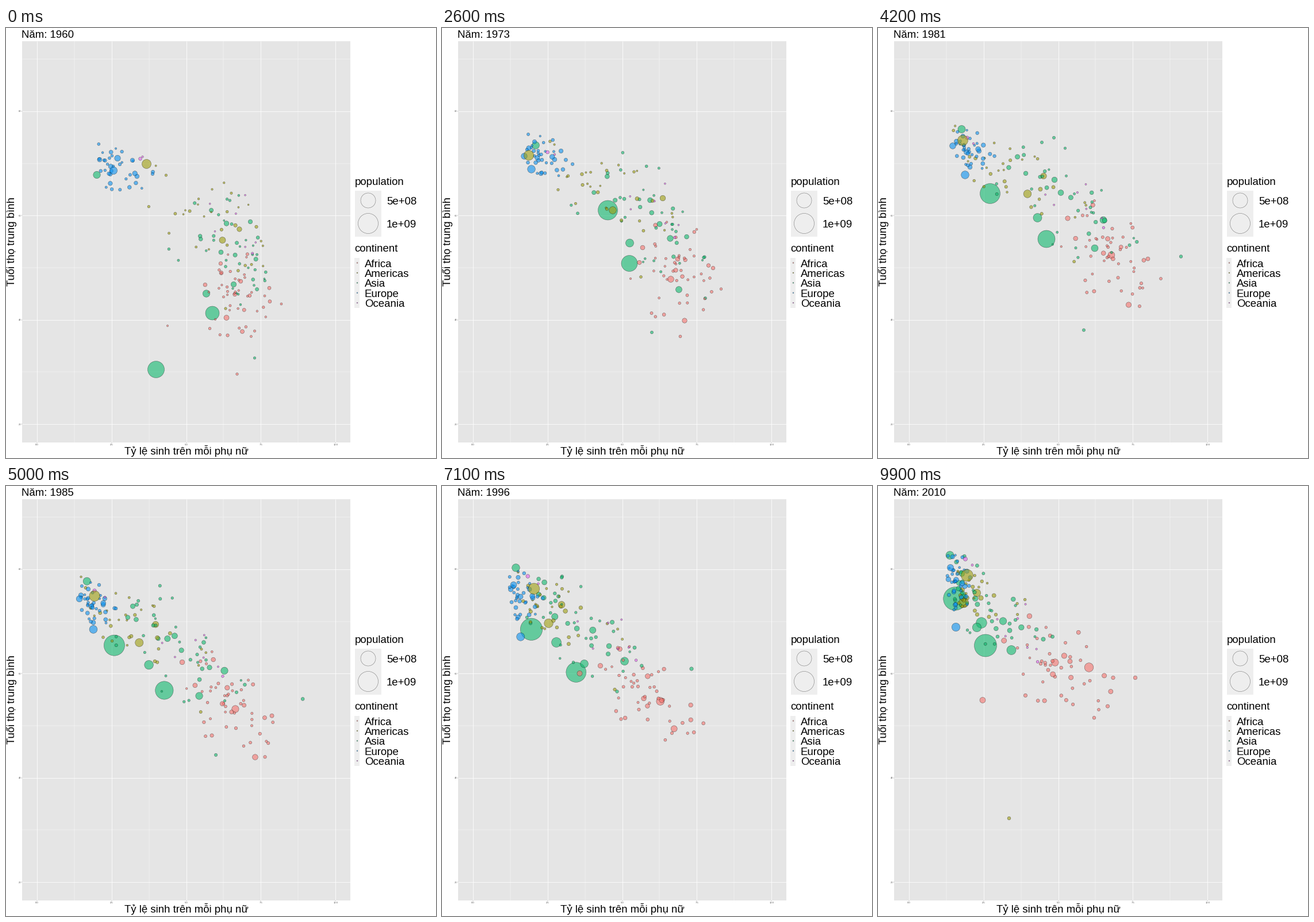
A matplotlib script that plays this animation: 748 by 748 pixels, repeating every 10 s.

```python
import numpy as np
import matplotlib.pyplot as plt
from matplotlib.animation import FuncAnimation
from matplotlib.patches import Circle, Rectangle

SIZE, FRAMES, PT = 748, 100, 0.72  # PT: points per pixel at 100 dpi
T = np.arange(FRAMES)
KEYS = {2: (0, 99), 3: (0, 42, 99), 4: (0, 26, 59, 99),
        7: (0, 12, 26, 42, 59, 83, 99)}
COLORS = {
    "Africa": (0.96, 0.45, 0.43),
    "Americas": (0.62, 0.62, 0.06),
    "Asia": (0.06, 0.72, 0.43),
    "Europe": (0.04, 0.57, 0.94),
    "Oceania": (0.88, 0.38, 0.93),
}
FILL_ALPHA = 0.6
EDGE = (0, 0, 0, 0.55)

plt.rcParams["font.family"] = "Liberation Sans"
rng = np.random.default_rng(12)
tracks = []  # (x, y, radius, colour), each path sampled at every frame


def curve(vals, times=None):
    return np.interp(T, times or KEYS[len(vals)], vals)


def bubble(group, r, xs, ys, times=None):
    tracks.append((curve(xs, times), curve(ys, times), curve(r), COLORS[group]))


def cloud(group, n, xs, ys, sx, sy, corr, skew, r, grow):
    """A drifting, correlated swarm of small bubbles."""
    cx, cy, wx, wy = map(curve, (xs, ys, sx, sy))
    rho, k = curve(corr), curve(skew)
    for _ in range(n):
        a, b = rng.normal(size=2).clip(-1.7, 1.7)
        phase, freq = rng.uniform(0, 2 * np.pi, 2), rng.uniform(0.5, 1.6, 2)
        u = a + 0.2 * np.sin(2 * np.pi * freq[0] * T / FRAMES + phase[0])
        v = b + 0.2 * np.sin(2 * np.pi * freq[1] * T / FRAMES + phase[1])
        x = cx + wx * (u + k * (u * u - 1))
        y = cy + wy * (rho * u + np.sqrt(1 - rho ** 2) * v)
        size = r[0] + r[1] * min(abs(rng.normal()), 2.2)
        tracks.append((x, y, size * np.linspace(1, grow, FRAMES), COLORS[group]))


# Large and outlying bubbles
bubble("Asia", (14.5, 15.3, 17, 17.5, 18.7, 19.7, 20.3),
       (261, 226, 370, 432, 376.5, 288.5, 195, 181, 130, 134),
       (594, 578, 460, 410, 368, 317, 288, 265, 233.5, 196),
       (0, 2, 4, 6, 12, 26, 42, 59, 83, 99))
bubble("Asia", (12, 12.9, 14, 15, 16.5, 18.3, 19.5),
       (359, 352.5, 326, 293, 255.5, 211, 187),
       (496, 455.5, 409.5, 367, 342.5, 305.5, 277.5))
bubble("Asia", (6.2, 7),
       (158, 158, 163, 145.5, 135.5, 121.5, 125),
       (255.5, 226, 204, 176, 154, 130.5, 120.5))
bubble("Asia", (6.2, 9.3),
       (348.5, 344.5, 326.5, 277.5, 216, 182, 180),
       (462, 469.5, 374, 330, 290, 254, 238))
bubble("Asia", (4.7, 7.7),
       (396, 413, 412, 377, 290, 205, 172),
       (446, 429, 455, 383, 345, 273.5, 246))
bubble("Asia", (4.3, 8),
       (383.5, 391, 397, 392, 366.5, 268.5, 232),
       (340, 314, 366, 334, 307, 302.5, 285.5))
bubble("Asia", (4, 6.2),
       (374, 370, 378.5, 318, 239, 153.5, 148),
       (390, 343, 341, 286.5, 242, 212.5, 194))
bubble("Asia", (3.7, 6.3),
       (425, 401.5, 362, 307, 278, 246.5, 217.5),
       (337, 318, 299.5, 264, 257, 244.5, 235))
bubble("Asia", (2.2, 3.6),
       (432.5, 440.5, 458, 527, 504, 364, 287.5),
       (574, 524, 470, 397.5, 340, 296, 266.5))
bubble("Asia", (2.4, 2.9),
       (382, 362, 365, 354, 358, 373, 236, 208),
       (415, 485, 529.5, 673, 525.5, 403, 312, 262),
       (0, 22, 26, 33, 42, 59, 83, 99))

bubble("Africa", (4.5, 7.8),
       (383.5, 383, 398, 406, 391, 368.5, 367),
       (504, 473, 437, 395, 380, 369, 315.5))
bubble("Africa", (3.5, 6.2),
       (411, 410.5, 422, 436, 430.5, 377, 308),
       (528, 516, 509, 481.5, 460.5, 384, 307))
bubble("Africa", (3.5, 5),
       (374.5, 357, 349, 330, 280, 199, 182),
       (426, 405, 382, 331, 279, 373, 372.5))
bubble("Africa", (2.2, 3.2),
       (402, 409, 414.5, 455, 445.5, 431, 409),
       (602, 582, 536.5, 484, 457, 400, 333.5))
bubble("Africa", (2, 3),
       (479, 480, 485.5, 492, 433, 320, 296),
       (480, 463.5, 454, 436, 383, 356, 320))
bubble("Africa", (2, 3.3),
       (450, 457.5, 466, 455.5, 457, 452.5, 447.5),
       (466, 488, 435, 452, 442, 383.5, 333.5))
bubble("Africa", (1.6, 1.9), (281, 328, 309, 264), (518, 436, 321, 299))

bubble("Americas", (5.5, 8.6),
       (376.5, 348, 297, 260, 200, 171, 149),
       (369, 343.5, 317, 288.5, 254.5, 223, 203))
bubble("Americas", (4.2, 6.6),
       (406, 405, 384, 288, 229, 187, 172),
       (350, 324.5, 296, 257.5, 222, 191, 186))
bubble("Americas", (2.2, 2.9),
       (382, 346, 336, 265, 232, 228),
       (488, 433, 378, 330, 328, 578), (0, 26, 59, 83, 97, 99))

# Small bubbles, one swarm per group
cloud("Africa", 44, (400, 412, 410, 405, 372, 330, 315),
      (470, 452, 425, 396, 368, 355, 322),
      (32, 38, 52), (42, 47, 48), (0.1, 0.1, 0.65, 0.45), (0, 0),
      (1.6, 0.85), 1.35)
cloud("Asia", 38, (392, 382, 352, 322, 265, 210, 188),
      (385, 358, 325, 292, 258, 215, 205),
      (45, 76, 48), (55, 62, 46), (0.4, 0.6, 0.55), (-0.2, 0.3),
      (1.5, 0.95), 1.32)
cloud("Americas", 30, (370, 345, 300, 245, 222, 195, 178),
      (340, 312, 285, 260, 233, 206, 192),
      (62, 65, 32), (52, 44, 24), (0.7, 0.8, 0.55), (-0.25, 0.25),
      (1.4, 0.8), 1.3)
cloud("Europe", 36, (192, 185, 175, 160, 145, 130, 137),
      (242, 230, 222, 211, 196, 184, 165),
      (25, 19, 12), (22, 18, 27), (0.35, 0.25, 0.05), (0.25, 0.2),
      (1.7, 1.4), 1.08)
cloud("Oceania", 7, (390, 380, 365, 345, 310, 262, 235),
      (365, 350, 335, 320, 290, 275, 268),
      (38, 55, 36), (55, 36, 42), (0.4, 0.4), (0, 0),
      (1.3, 0.4), 1.15)

bubble("Oceania", (2.8, 3.5),
       (233.5, 204, 183.5, 155, 153, 145.5, 152),
       (227.5, 228, 216, 191, 172, 142, 127))
bubble("Oceania", (1.7, 2),
       (237.5, 216.5, 196, 166, 179, 156, 164),
       (224, 225, 220, 201, 185, 155, 137.5))
bubble("Europe", (6.6, 7.2),
       (187, 163, 155.5, 151.5, 152.5, 121, 135.5),
       (248, 240.5, 245.5, 255.5, 242.5, 282, 245.5))
bubble("Europe", (5.2, 5.6),
       (194, 181, 143, 130, 125, 124, 126),
       (226.5, 228, 223, 205, 186.5, 157.5, 142))
bubble("Americas", (8, 10.4),
       (244.5, 195, 151, 147.5, 161.5, 158.5, 155),
       (236.5, 232, 221.5, 195.5, 186.5, 171, 155.5))

X = np.array([t[0] for t in tracks]).T
Y = np.array([t[1] for t in tracks]).T
R = np.array([t[2] for t in tracks]).T

fig = plt.figure(figsize=(SIZE / 100, SIZE / 100), dpi=100, facecolor="white")
ax = fig.add_axes([0, 0, 1, 1])
ax.set(xlim=(0, SIZE), ylim=(SIZE, 0))
ax.axis("off")


def rect(x0, y0, x1, y1, color):
    ax.add_patch(Rectangle((x0, y0), x1 - x0, y1 - y0, fc=color, lw=0, zorder=0))


def line(xs, ys, px, color="white"):
    ax.plot(xs, ys, color=color, lw=px * PT, zorder=1, solid_capstyle="butt")


def label(x, y, s, px=18.67, color="black", **kw):
    kw.setdefault("va", "baseline")
    return ax.text(x, y, s, fontsize=px * PT, color=color, **kw)


def ring(x, y, r, fill="none"):
    ax.add_patch(Circle((x, y), r, fc=fill, ec=EDGE, lw=0.5 * PT, zorder=2))


# Panel with grid, ticks and tick labels
L, TOP, RIGHT, BOTTOM = 28, 22.5, 599.5, 720.5
rect(L, TOP, RIGHT, BOTTOM, "#e5e5e5")
for i in range(9):
    gx = 54 + 64.9 * i
    line((gx, gx), (TOP, BOTTOM), 0.4 if i % 2 else 0.8)
    if i % 2 == 0:
        line((gx, gx), (BOTTOM, BOTTOM + 1), 0.4, "#333333")
        label(gx, 725.7, f"{1.25 * i:.1f}", 4.1, "#4d4d4d", ha="center")
for i in range(8):
    gy = 54.2 + 90.7 * i
    line((L, RIGHT), (gy, gy), 0.8 if i % 2 else 0.4)
    if i % 2:
        line((L - 1, L), (gy, gy), 0.4, "#333333")
        label(26, gy + 1.5, str(90 - 10 * i), 4.1, "#4d4d4d", ha="right")

label(313.5, 741.5, "Tỷ lệ sinh trên mỗi phụ nữ", ha="center")
label(15.5, 371.5, "Tuổi thọ trung bình", rotation=90, ha="right",
      va="center", rotation_mode="default").set(
          ha="center", va="baseline", rotation_mode="anchor")
title = label(27.5, 16.5, "")

# Legends
label(606.5, 273, "population")
rect(607, 283, 653.5, 363, "#eeeeee")
for y, r, s in ((300, 13, "5e+08"), (340, 17.5, "1e+09")):
    ring(630, y, r)
    label(662, y + 6.7, s)

label(606.5, 389, "continent")
rect(606.5, 399.5, 615.5, 487, "#eeeeee")
for i, (name, color) in enumerate(COLORS.items()):
    y = 408.5 + 17.4 * i
    ring(611, y, 0.9, (*color, FILL_ALPHA))
    label(624, y + 7, name)

dots = ax.scatter(X[0], Y[0], s=1, c=[(*t[3], FILL_ALPHA) for t in tracks],
                  edgecolors=[EDGE], linewidths=0.5 * PT, zorder=3)


def draw(i):
    dots.set_offsets(np.column_stack((X[i], Y[i])))
    dots.set_sizes((2 * R[i] * PT) ** 2)
    title.set_text(f"Năm: {1960 + round(i * 50 / (FRAMES - 1))}")
    return dots, title


anim = FuncAnimation(fig, draw, frames=FRAMES, interval=100,
                     repeat=True, repeat_delay=0, blit=False)
plt.show()
```
